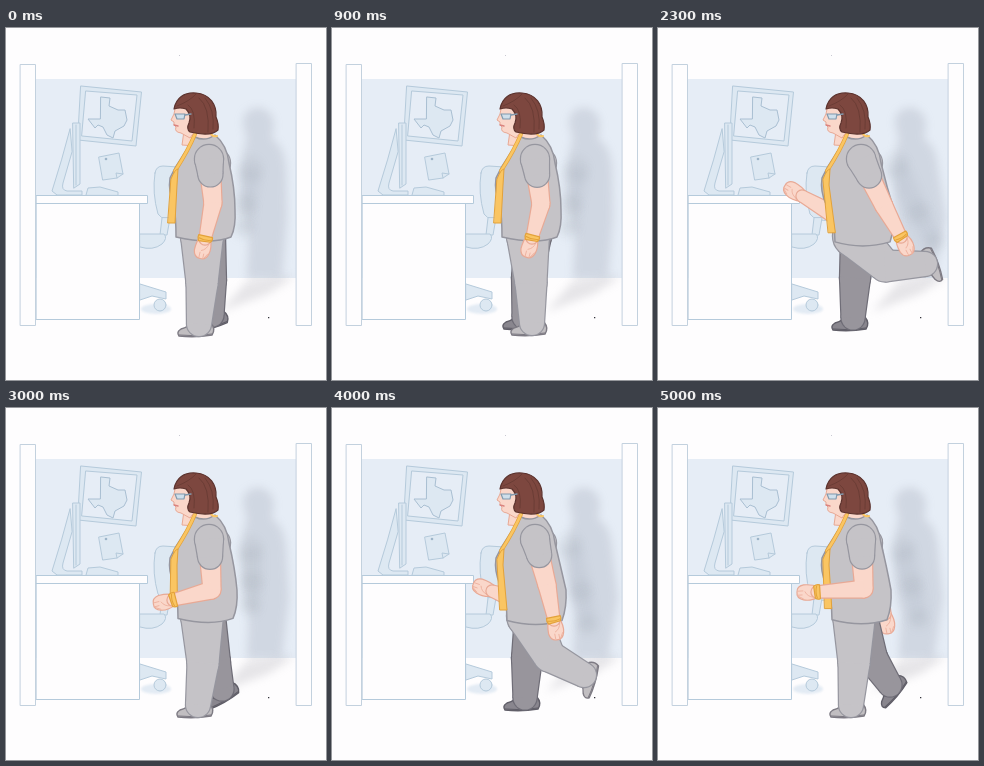
Animation of 320x352 px, one loop 5100 ms. Source, as an HTML page with a canvas:

```html
<!DOCTYPE html>
<html lang="en">
<head>
<meta charset="utf-8">
<title>Walking in place</title>
<style>
html, body { margin: 0; width: 100%; height: 100%; overflow: hidden; background: #fefdfe; }
canvas { display: block; width: 320px; height: 352px; }
</style>
</head>
<body>
<canvas id="stage" width="320" height="352"></canvas>
<script>
(() => {
const ctx = document.getElementById('stage').getContext('2d');
const LOOP = 5100, STEP = 100;

const PAPER = '#fefdfe', WALL = '#e6edf6';
const SKIN = '#fad7ca', SKIN_LINE = '#e8a995';
const CLOTH = '#c5c3c7', CLOTH_LINE = '#96969f';
const DARK = '#98959c', DARK_LINE = '#6f6d77';
const GOLD = '#fac562', GOLD_LINE = '#e3a23a';
const BLUE = '#dde8f2', BLUE_LINE = '#b5cadb';

// near elbow, near wrist, far elbow, far wrist,
// near knee, near ankle, near shoe angle, far knee, far ankle, far shoe angle, sway
const poses = {
  stand:    [207,175, 199,211, 205,170, 203,196, 196,255, 193,296,0,   205,252, 206,287,-14, 0],
  pass:     [209,176, 200,210, 205,170, 203,196, 199,255, 200,295,0,   195,250, 192,289,0,   0],
  farKick:  [204,182, 157,182, 235,174, 253,199, 196,255, 195,296,0,   230,244, 264,246,-80, 8],
  nearKick: [226,178, 243,209, 177,187, 144,168, 227,238, 267,236,-108, 197,250, 195,290,0,  7],
  farLift:  [206,182, 167,192, 212,168, 210,194, 197,255, 192,297,0,   209,254, 216,281,-28, 2],
  nearLift: [215,177, 222,212, 180,190, 160,183, 217,248, 252,267,-72, 195,250, 193,290,0,   5],
  farSwing: [206,181, 159,184, 220,172, 227,206, 196,255, 193,297,0,   214,250, 232,277,-48, 4]
};

const timeline = [
  [0, 'stand'], [230, 'nearLift'], [450, 'nearKick'], [700, 'nearLift'], [900, 'pass'],
  [1050, 'farLift'], [1200, 'farSwing'], [1450, 'farKick'], [1550, 'farKick'],
  [1750, 'farSwing'], [1870, 'stand'], [2050, 'nearLift'], [2250, 'nearKick'],
  [2400, 'nearKick'], [2650, 'nearLift'], [2850, 'pass'], [3000, 'farLift'],
  [3150, 'farSwing'], [3350, 'farKick'], [3600, 'farSwing'], [3750, 'stand'],
  [4000, 'nearLift'], [4250, 'nearKick'], [4450, 'nearLift'], [4550, 'pass'],
  [4680, 'farSwing'], [4820, 'farKick'], [5000, 'farSwing'], [5100, 'stand']
];

function poseAt(t) {
  let i = 0;
  while (i < timeline.length - 2 && timeline[i + 1][0] <= t) i++;
  const [t0, a] = timeline[i], [t1, b] = timeline[i + 1];
  const k = (t - t0) / (t1 - t0);
  const v = poses[a].map((n, j) => n + (poses[b][j] - n) * k);
  const at = j => [v[j], v[j + 1]];
  return {
    nearArm: [[203, 131], at(0), at(2)],
    farArm: [[210, 135], at(4), at(6)],
    nearLeg: [[196, 208], at(8), at(10)], nearShoe: v[12],
    farLeg: [[201, 208], at(13), at(15)], farShoe: v[17],
    sway: v[18]
  };
}

const mix = (a, b, k) => [a[0] + (b[0] - a[0]) * k, a[1] + (b[1] - a[1]) * k];

function paint(path, fill, line, width = 1) {
  const p = typeof path === 'string' ? new Path2D(path) : path;
  if (fill) { ctx.fillStyle = fill; ctx.fill(p); }
  if (line) { ctx.strokeStyle = line; ctx.lineWidth = width; ctx.stroke(p); }
}

function box(x, y, w, h, fill, line) {
  const p = new Path2D();
  p.rect(x, y, w, h);
  paint(p, fill, line);
}

function oval(x, y, rx, ry, fill, line) {
  const p = new Path2D();
  p.ellipse(x, y, rx, ry, 0, 0, Math.PI * 2);
  paint(p, fill, line);
}

// Tapered tube through points; outline first, then fill, so joints merge.
function limb(points, radii, fill, line) {
  const parts = [];
  points.forEach(([x, y], i) => {
    const disc = new Path2D();
    disc.arc(x, y, radii[i], 0, Math.PI * 2);
    parts.push(disc);
    if (!i) return;
    const [px, py] = points[i - 1];
    const a = Math.atan2(y - py, x - px) + Math.PI / 2;
    const c = Math.cos(a), s = Math.sin(a), r = radii[i - 1], q = radii[i];
    const side = new Path2D();
    side.moveTo(px + c * r, py + s * r);
    side.lineTo(x + c * q, y + s * q);
    side.lineTo(x - c * q, y - s * q);
    side.lineTo(px - c * r, py - s * r);
    side.closePath();
    parts.push(side);
  });
  if (line) parts.forEach(p => paint(p, null, line, 2.4));
  parts.forEach(p => paint(p, fill));
}

function local([x, y], angle, draw) {
  ctx.save();
  ctx.translate(x, y);
  ctx.rotate(angle);
  draw();
  ctx.restore();
}

function office() {
  ctx.fillStyle = PAPER;
  ctx.fillRect(0, 0, 320, 352);
  box(30, 51, 260, 199, WALL);

  // picture on the wall
  paint('M75 58L135.5 64L130 118L72 112Z', BLUE, BLUE_LINE);
  paint('M80 63L131 67L126 113L76 108Z', WALL, BLUE_LINE);
  paint('M95 69L104 70L103 78L112 82L119 82L121 92L118 98L109 103L107 110L101 107L97 99L92 97L89 100L82 91L94 91Z', BLUE, '#a9bfd2');

  // monitor, note, keyboard
  paint('M64 101Q56 132 46 163L51 167H76V163H61Q55 162 57 155L66 124Z', BLUE, BLUE_LINE);
  paint('M67 95H74L74 156L68 160Z', BLUE, BLUE_LINE);
  paint('M70 97V157', null, BLUE_LINE);
  paint('M93 129L113 125L117 146L111 150L97 152Z', BLUE, BLUE_LINE);
  paint('M117 146L110 145L111 150', null, BLUE_LINE);
  oval(100, 131, 1.3, 1.3, '#9db4c8');
  paint('M80 167L82 160L94 159L112 164V167Z', BLUE, BLUE_LINE);

  // chair
  ctx.save();
  ctx.filter = 'blur(1px)';
  oval(150, 281, 15, 5, '#e3ebf4');
  ctx.restore();
  paint('M149 145Q150 138 157 138L172 139V192Q158 194 152 186Q146 165 149 145Z', BLUE, BLUE_LINE);
  paint('M156 190L154 207H161L164 190Z', BLUE, BLUE_LINE);
  paint('M134 206H158Q162 210 156 216Q147 223 134 219Z', BLUE, BLUE_LINE);
  paint('M134 256L160 264V271L146 268L134 272Z', BLUE, BLUE_LINE);
  oval(154, 277, 6, 6, BLUE, BLUE_LINE);

  // desk and left post
  box(30.5, 175.5, 103, 116, PAPER, BLUE_LINE);
  box(30.5, 167.5, 111, 8, PAPER, BLUE_LINE);
  box(14.5, 36.5, 15, 261, PAPER, '#c3d1de');
}

function shadow(p) {
  ctx.save();
  ctx.beginPath();
  ctx.rect(150, 51, 140, 240);
  ctx.clip();
  ctx.filter = 'blur(4px)';
  paint('M214 284L240 254L290 248L262 266Z', 'rgba(165,165,172,.27)');
  const s = p.sway;
  paint(`M237 96C236 75 266 74 268 96L266 111Q278 118 280 140L${281 + s} 190L276 250H241L243 205Q235 180 236 150Q236 122 241 111Z`, 'rgba(140,145,160,.23)');
  const back = p.nearArm[2][0] > p.farArm[2][0] ? p.nearArm : p.farArm;
  ctx.translate(34, 6);
  ctx.globalAlpha = .12;
  limb(back, [12, 10, 9], '#8c91a0');
  ctx.restore();
}

function shoe(ankle, deg, fill, line) {
  local(ankle, deg * Math.PI / 180, () => {
    paint('M-9 0Q-13 4 -18 5Q-23 8 -20 12Q-4 14 13 11Q17 5 12 -1Z', fill, line, 1.4);
    paint('M-9 3Q-5 9 2 9L4 -1H-8Z', '#eccfc6');
    paint('M-12 4Q-5 12 6 7M-20 11Q-4 13 13 10', null, line);
  });
}

function leg(points, angle, near) {
  const fill = near ? CLOTH : DARK, line = near ? CLOTH_LINE : DARK_LINE;
  shoe(points[2], angle, near ? '#c1bec1' : '#89868e', near ? '#7d7a83' : '#605e68');
  limb(points, near ? [21, 15.5, 12] : [18, 15, 11.5], fill, line);
}

function arm(points, near) {
  const [shoulder, elbow, wrist] = points;
  const a = Math.atan2(wrist[1] - elbow[1], wrist[0] - elbow[0]);
  local(wrist, a, () => {
    paint('M-2 -5Q7 -9 14 -7Q21 -5 20 1Q20 7 13 8Q4 8 -2 5Z', SKIN, SKIN_LINE, 1.2);
    paint('M4 -5Q10 -4 12 1M14 -6L19 -3M15 -2H20M14 2H19', null, '#eeb3a1', .9);
  });
  limb([mix(shoulder, elbow, .3), elbow, wrist], [10, 8.5, 5.5], SKIN, SKIN_LINE);
  if (near) {
    local(wrist, a, () => {
      paint('M-3 -7Q0 -8 2 -6L3 6Q0 8 -3 7Z', GOLD, GOLD_LINE, 1.2);
      paint('M0 -6Q2 0 0 6', null, GOLD_LINE);
    });
  }
  limb([shoulder, mix(shoulder, elbow, near ? .35 : .2)], [14, 12], CLOTH, CLOTH_LINE);
}

function tunic(s) {
  const back = 229 + s, hem = 212 + s * .7, front = 170 + s;
  paint('M178 103L176 117L190 118L206 112L204 101Z', SKIN, SKIN_LINE);
  paint(`M189 109Q199 114 209 107Q221 117 223 135Q229 160 ${back} 182Q${back + 1} 199 ${back - 4} ${hem - 3}`
    + `Q205 ${hem + 5} ${front} ${hem - 3}Q${front} 190 168 176Q162 163 164 150Q169 139 176 129Z`, CLOTH, CLOTH_LINE, 1.5);
}

function lanyard(s) {
  const x = 166 + s * 1.2, y = 195 + s * 1.4;
  paint('M189 106Q183 121 169 143', null, GOLD_LINE, 4);
  paint('M189 106Q183 121 169 143', null, GOLD, 2.6);
  paint('M205 106Q207 109 211 108', null, GOLD, 2);
  paint(`M165 151Q169 141 172 141L171 157L${x + 3} ${y}H${x - 4}Z`, GOLD, GOLD_LINE);
}

function head() {
  paint('M170 76Q169 81 168 86L165 92L168 94L168 97L170 99Q168 104 175 105L184 110L191 100L188 76Z', SKIN, SKIN_LINE);
  paint('M168 97L172 98', null, '#d9837f', 1.3);
  paint('M168 81C170 70 178 64 190 65C204 66 211 77 210 89Q213 96 212 102Q205 109 184 104Q180 101 183 95Q186 87 180 81Q174 79 168 81Z', '#7d473f', '#5b322d', 1.2);
  paint('M171 78Q184 73 190 66M182 77Q190 82 188 100M193 70Q204 79 202 104M199 70Q209 82 207 101', null, '#663a33', .8);
  paint('M169 86L179 86L178 91L171 91Z', '#cfdfeb', '#8099ad', 1.2);
  paint('M179 87L185 86', null, '#8099ad', 1.4);
}

function draw(t) {
  const p = poseAt(t);
  ctx.lineJoin = ctx.lineCap = 'round';
  office();
  shadow(p);
  box(290.5, 35.5, 15, 262, PAPER, '#c3d1de');
  box(173, 27, 1, 1, '#c9c9d2');
  box(262, 289, 1.3, 1.3, '#33333b');
  arm(p.farArm, false);
  leg(p.farLeg, p.farShoe, false);
  leg(p.nearLeg, p.nearShoe, true);
  tunic(p.sway);
  lanyard(p.sway);
  head();
  arm(p.nearArm, true);
}

const start = performance.now();
let shown = -1;
function tick() {
  const t = Math.floor(((performance.now() - start) % LOOP) / STEP) * STEP;
  if (t !== shown) draw(shown = t);
  requestAnimationFrame(tick);
}
tick();
})();
</script>
</body>
</html>
```
